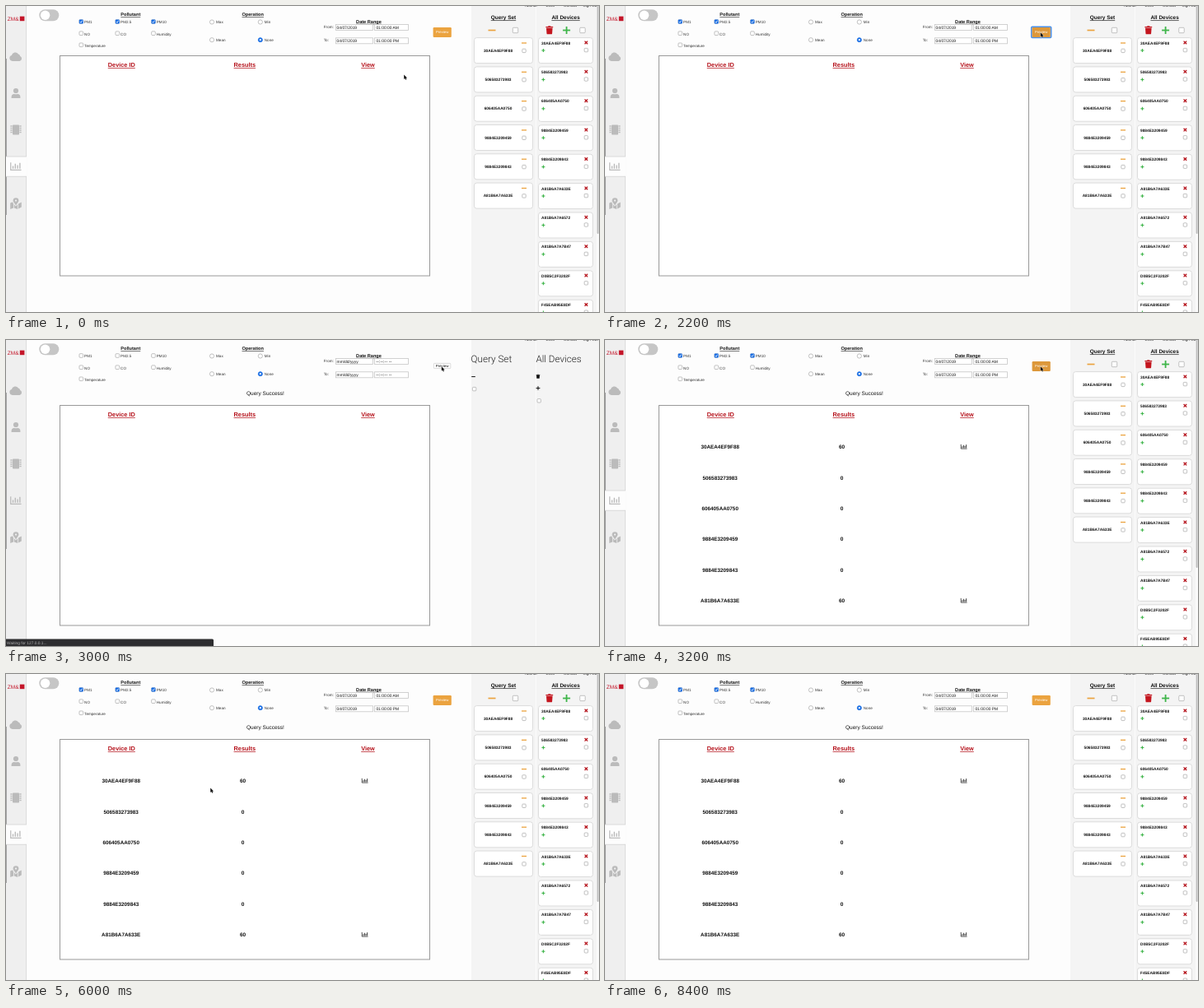
Write an HTML page that moves like this. It is 720x372 px and loops after 8.9 s.

```html
<!DOCTYPE html>
<html lang="en">
<head>
<meta charset="utf-8">
<title>Device query</title>
<style>
  html, body { margin: 0; width: 100%; height: 100%; overflow: hidden; background: #fdfdfd; }
  svg { display: block; width: 100%; height: 100%; }
  text { font-family: "Liberation Sans", Arial, sans-serif; white-space: pre; text-rendering: geometricPrecision; }
  .b { font-weight: 700; }
  .m { text-anchor: middle; }
  .u { text-decoration: underline; text-decoration-thickness: .11em; }
  .light { font-family: Roboto, "Open Sans", sans-serif; font-weight: 300; }
</style>
</head>
<body>
<svg id="stage" viewBox="0 0 720 372" xmlns="http://www.w3.org/2000/svg"></svg>
<script>
const LOOP = 8900, STEP = 100;
const RED = '#b5121b', ORANGE = '#eba33f', GREEN = '#3fb54a', GREY = '#bbb', BLUE = '#1b6fe4';
const IDS = ['30AEA4EF9F88', '506583273983', '606405AA0750', '9884E3209459', '9884E3209843',
  'A81B6A7A633E', 'A81B6A7A6572', 'A81B6A7A7B47', 'D0B5C2F3202F', 'F45EAB95E8DF'];
const QUERY = IDS.slice(0, 6);

// Markup helpers
const text = (x, y, size, s, cls = '', fill = '#111') =>
  `<text x="${x}" y="${y}" font-size="${size}" class="${cls}" fill="${fill}">${s}</text>`;
const rect = (x, y, w, h, fill, stroke = 'none', r = 0, sw = 0.7) =>
  `<rect x="${x}" y="${y}" width="${w}" height="${h}" rx="${r}" fill="${fill}" stroke="${stroke}" stroke-width="${sw}"/>`;
const line = (d, stroke, sw) => `<path d="${d}" fill="none" stroke="${stroke}" stroke-width="${sw}"/>`;
const shape = (d, fill) => `<path d="${d}" fill="${fill}"/>`;
const at = (x, y, k, body) => `<g transform="translate(${x} ${y}) scale(${k})">${body}</g>`;
const group = (id, body) => `<g id="${id}">${body}</g>`;

const minus = (x, y, w, c, sw) => line(`M${x - w / 2} ${y}h${w}`, c, sw);
const plus = (x, y, w, c, sw) => minus(x, y, w, c, sw) + line(`M${x} ${y - w / 2}v${w}`, c, sw);
const cross = (x, y, r) => line(`M${x - r} ${y - r}l${2 * r} ${2 * r}m0 ${-2 * r}l${-2 * r} ${2 * r}`, RED, 1.3);
const box = (x, y, w = 4.4) => rect(x - w / 2, y - w / 2, w, w, '#fff', '#999', 0.9, 0.6);
const ticked = (x, y) => rect(x - 2.5, y - 2.5, 5, 5, BLUE, 'none', 0.9) +
  line(`M${x - 1.4} ${y}l1 1.3l1.9 -2.7`, '#fff', 0.8);
const radio = (x, y, on) =>
  `<circle cx="${x}" cy="${y}" r="2.6" fill="${on ? BLUE : '#fff'}" stroke="${on ? BLUE : '#999'}" stroke-width=".6"/>` +
  (on ? `<circle cx="${x}" cy="${y}" r="1.1" fill="#fff"/>` : '');
const chart = (x, y, k, c) => at(x, y, k,
  line('M-7.2 -5.5V5H7.5', c, 1.4) + line('M-4 3.2V-.6M-.8 3.2V-3.6M2.4 3.2V-1.6M5.6 3.2V-4.8', c, 1.6));
const trash = (x, y, k, c) => at(x, y, k,
  shape('M-4.4 -4.4h2.6l.5 -.7h2.6l.5 .7h2.6v1.2h-8.8zM-3.8 -2.6h7.6l-.5 6.6q-.1 .9 -1 .9h-4.6q-.9 0 -1 -.9z', c));

function sidebar() {
  const pins = [-5, -2.5, 0, 2.5].map(v => `M-6.6 ${v}h2.2m8.8 0h2.2`).join('');
  return at(12, 62, 1, shape('M-4.3 5a3.6 3.6 0 0 1 -.9 -7a4.6 4.6 0 0 1 8.2 -1.6a2.8 2.8 0 0 1 2.2 2.7a3.1 3.1 0 0 1 -.7 5.9z', GREY)) +
    at(12, 106, 1, `<circle cy="-3" r="3.1" fill="${GREY}"/>` +
      shape('M-5.4 6v-1.6a3.6 3.6 0 0 1 3.4 -3.5q2 .8 4 0a3.6 3.6 0 0 1 3.4 3.5v1.6z', GREY)) +
    at(12, 151, 1, rect(-4, -6.5, 8, 12, GREY, 'none', 0.8) + line(pins, GREY, 1.3)) +
    chart(12, 195, 0.87, GREY) +
    at(12, 240, 1, shape('M-6.8 -.6l2.8 -1.2l1 2.2v5.2l-3.8 1.4zM-2.2 1l2.2 2.6l2.2 -2.6v6l-4.4 -1.4zM3 .4l3.8 -2v6.2l-3.8 2z', GREY) +
      shape('M0 2.2q-3.4 -4 -3.4 -5.6a3.4 3.4 0 0 1 6.8 0q0 1.6 -3.4 5.6z', GREY) +
      '<circle cy="-3.4" r="1.1" fill="#efefef"/>');
}

function form() {
  const label = (x, y, s) => text(x, y, 4.6, s, '', '#333');
  const head = (x, y, s) => text(x, y, 5.6, s, 'b m u');
  const field = y => rect(400.5, y, 45, 7, '#fff', '#c6c6c6', 0, 0.8) + rect(447.5, y, 41, 7, '#fff', '#c6c6c6', 0, 0.8);
  const spots = [['PM1', 91.3, 19], ['PM2.5', 135.3, 19], ['PM10', 179, 19], ['NO', 91.3, 33.2],
    ['CO', 135.3, 33.2], ['Humidity', 179, 33.2], ['Temperature', 91.3, 47.3]];
  return rect(40.3, 4.3, 24, 14, '#c6c6c6', 'none', 7) +
    '<circle cx="47.6" cy="11.3" r="5.7" fill="#fff"/>' +
    head(151.3, 12, 'Pollutant') + head(299.7, 12, 'Operation') + head(440.5, 20.8, 'Date Range') +
    spots.map(([s, x, y]) => box(x, y, 4.6) + label(x + 3.8, y + 2.4, s)).join('') +
    [['Max', 250, 19.5], ['Min', 308.8, 19.5], ['Mean', 250, 41.2], ['None', 308.8, 41.2]]
      .map(([s, x, y]) => radio(x, y, s === 'None') + label(x + 5, y + 1.9, s)).join('') +
    label(385.8, 26.8, 'From:') + label(385.8, 43.2, 'To:') + field(22.5) + field(38.8);
}

function table() {
  const head = (x, s) => text(x, 74.3, 7.35, s, 'b m u', RED);
  return rect(65.5, 60.5, 449, 267.5, '#fff', '#999', 0, 1) +
    head(140.3, 'Device ID') + head(289.8, 'Results') + head(439.5, 'View');
}

const rows = () => QUERY.map((id, i) => {
  const y = 129.8 + 37.4 * i, hit = i % 5 === 0;
  return text(139.7, y + 2.4, 6.35, id, 'b m') + text(287.6, y + 2.4, 6.5, hit ? 60 : 0, 'b m') +
    (hit ? chart(435.8, y - 0.2, 0.5, '#111') : '');
}).join('');

function styled() {
  const dates = y => text(401.6, y, 4.9, '04/07/2019');
  const left = QUERY.map((id, i) => at(0, 35.3 * i, 1,
    rect(568.5, 38.6, 71, 31, '#fff', '#cfcfcf', 3) + text(597.5, 55.9, 4.8, id, 'b m') +
    minus(629, 45, 6, ORANGE, 1.3) + box(629, 54.4))).join('');
  const right = IDS.map((id, i) => at(0, 35.4 * i, 1,
    rect(646.5, 38.6, 66, 31, '#fff', '#cfcfcf', 3) + text(650, 46.5, 4.8, id, 'b') +
    cross(704.4, 44.4, 1.8) + plus(652.4, 54, 4, GREEN, 1.1) + box(704.4, 53.6))).join('');
  return rect(-1, 183, 26.5, 24.3, '#fdfdfd') + line('M0 183h25M0 207.3h25', '#d2d2d2', 0.8) + chart(12, 195, 0.87, GREY) +
    [91.3, 135.3, 179].map(x => ticked(x, 19)).join('') +
    dates(27.9) + dates(44.1) + text(449.4, 27.9, 4.9, '01:00:00 AM') + text(449.4, 44.1, 4.9, '01:00:00 PM') +
    rect(717, 0, 3, 372, '#fafafa') + rect(717.6, -3, 2, 280, '#bdbdbd', 'none', 1) +
    text(604, 16.4, 6.45, 'Query Set', 'b m u') + text(679.6, 16.4, 6.45, 'All Devices', 'b m u') +
    minus(590, 29.5, 9, ORANGE, 1.7) + box(618.5, 29.5, 6.4) +
    trash(659.8, 29.4, 1, '#c4161f') + plus(680.6, 29.5, 9, GREEN, 1.8) + box(700, 29.5, 6.4) +
    left + right +
    `<rect id="ring" x="517.8" y="25.3" width="23.8" height="13" rx="1" fill="none" stroke="#4b90e8" stroke-width="1.7"/>` +
    `<rect id="button" x="518.6" y="26" width="22.2" height="11.9" rx="1.2" fill="${ORANGE}"/>` +
    text(529.7, 33.4, 4.3, 'Preview', 'm', '#fff');
}

function unstyled() {
  const blank = y => text(401.6, y, 4.9, 'mm/dd/yyyy') + text(449.2, y, 5.5, '--:--:-- --');
  return blank(27.9) + blank(44.1) +
    rect(519.4, 28.4, 20.4, 6.2, '#fff', '#c4c4c4', 0.8, 0.6) + text(529.6, 33, 4.4, 'Preview', 'm') +
    text(564.6, 27.2, 11.7, 'Query Set', 'light', '#222') + text(643.4, 27.2, 11.7, 'All Devices', 'light', '#222') +
    minus(567.5, 44.6, 4.6, '#111', 1) + box(568.6, 59.6) +
    trash(646, 44.3, 0.52, '#111') + plus(646, 58.5, 4.8, '#111', 1) + box(647.2, 73.8);
}

const arrow = '<path d="M0 0V5.4L1.2 4.4L2.1 6.2L3.1 5.8L2.3 4H3.9Z" fill="#111" stroke="#fff" stroke-width=".6" paint-order="stroke"/>';
const beam = line('M-1.2 -3.4q1.2 0 1.2 .9v5q0 .9 -1.2 .9M1.2 -3.4q-1.2 0 -1.2 .9v5q0 .9 1.2 .9', '#333', 0.6);

document.getElementById('stage').innerHTML =
  rect(0, 0, 720, 372, '#fdfdfd') + rect(0, 0, 24.5, 372, '#efefef') + line('M24.6 0V372', '#d2d2d2', 0.8) +
  rect(565, 0, 78, 372, '#f4f4f4') + rect(643.8, 0, 76.2, 372, '#f4f4f4') +
  text(1.8, 18, 6.5, 'ZM&amp;', '', '#c4162a') + rect(16.8, 12.6, 5.6, 5.6, '#c4162a') +
  sidebar() + line('M.2 64V254', '#666', 0.8) +
  [[629, 'Tutorial'], [655.5, 'Docs'], [677, 'Contact'], [700.5, 'Sign Out']]
    .map(([x, s]) => text(x, 1.4, 4.7, s, '', '#333')).join('') +
  form() + group('table', table()) +
  group('success', text(315, 66.5, 6.5, 'Query Success!', 'm')) + group('rows', rows()) +
  group('styled', styled()) + group('unstyled', unstyled()) +
  group('status', rect(-2, 363.6, 254, 10, '#2d2d2f', 'none', 1.5) + text(1, 369.7, 4.85, 'Waiting for 127.0.0.1...', '', '#b5b5b5')) +
  group('cursor', group('arrow', arrow) + group('beam', beam));

const el = id => document.getElementById(id);
const show = (id, on) => el(id).setAttribute('display', on ? 'inline' : 'none');

// Pointer path: time, x, y, easing of the leg that ends here
const linear = p => p, smooth = p => p * p * (3 - 2 * p), out = p => 1 - (1 - p) ** 2;
const PATH = [
  [0, 483.2, 83.5], [900, 536, 38, smooth], [1100, 528.8, 32.2, linear],
  [4300, 528.8, 32.2, linear], [5200, 305, 120, linear], [6100, 247.5, 138.8, out],
  [6600, 293, 172, smooth], [6900, 288.7, 167.8, smooth], [7100, 288.7, 167.8, linear],
  [7800, 289, 204.6, smooth], [8100, 289, 204.6, linear], [8300, 477, 20, linear], [LOOP, 477, 20, linear]
];

function pointer(t) {
  const i = PATH.findIndex(k => k[0] > t);
  const [t0, x0, y0] = PATH[i - 1], [t1, x1, y1, ease] = PATH[i];
  const p = ease((t - t0) / (t1 - t0));
  return [x0 + (x1 - x0) * p, y0 + (y1 - y0) * p];
}

function draw(ms) {
  const t = Math.floor((ms % LOOP) / STEP) * STEP;
  const reload = t >= 2900 && t < 3100, sent = t >= 2900;
  const [x, y] = pointer(t);
  const onButton = x > 518 && x < 541 && y > 26 && y < 38;
  show('styled', !reload);
  show('unstyled', reload);
  show('success', sent);
  show('rows', t >= 3100);
  show('status', t >= 2700 && t < 3100);
  show('ring', t >= 900 && !sent);
  el('button').setAttribute('fill', onButton ? '#dd983a' : ORANGE);
  el('table').setAttribute('transform', `translate(0 ${sent ? 19 : 0})`);
  const overText = x > 285 && x < 291 && (Math.abs(y - 167.5) < 3 || Math.abs(y - 204.6) < 3);
  show('arrow', !overText);
  show('beam', overText);
  show('cursor', t < 8400);
  el('cursor').setAttribute('transform', `translate(${x} ${y})`);
}

const start = performance.now();
function tick() {
  draw(performance.now() - start);
  requestAnimationFrame(tick);
}
tick();
</script>
</body>
</html>
```
